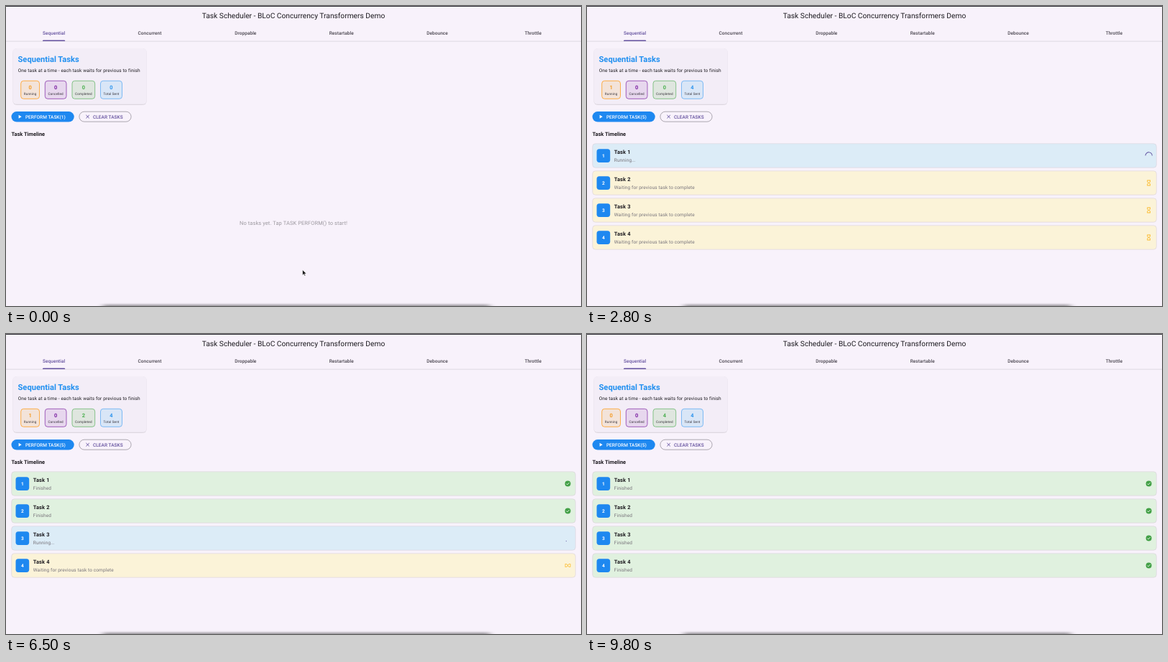
An HTML page for the animation above (9.9 s loop, 800 by 418 pixels).

```html
<!DOCTYPE html>
<html lang="en">
<head>
<meta charset="utf-8">
<title>Task Scheduler</title>
<style>
  html, body { margin: 0; width: 100%; height: 100%; overflow: hidden; background: #f8f2fb; }
  svg { display: block; width: 800px; height: 418px; }
  text { font-family: Roboto, sans-serif; font-size: 6.51px; letter-spacing: .116px; fill: #1d1b20; text-rendering: geometricPrecision; }
  .mid { text-anchor: middle; }
  .title { font-size: 10.23px; letter-spacing: 0; }
  .label { font-weight: 500; letter-spacing: .047px; }
  .heading { font-size: 11.16px; font-weight: 700; letter-spacing: 0; fill: #2190f0; }
  .count { font-size: 7.44px; font-weight: 700; }
  .tiny { font-size: 4.65px; fill: #37333b; }
  .section { font-size: 7.44px; font-weight: 700; letter-spacing: 0; }
  .task { font-size: 7.44px; font-weight: 700; letter-spacing: .15px; }
  .sub { fill: #77737a; }
  .empty { font-size: 7.44px; fill: #9c989f; }
  .badge { font-weight: 700; fill: #fff; }
  .hidden { display: none; }
</style>
</head>
<body>
<svg id="stage" viewBox="0 0 800 418">
  <defs>
    <filter id="soft" x="-10%" y="-20%" width="120%" height="150%">
      <feDropShadow dx="0" dy=".5" stdDeviation=".6" flood-color="#000" flood-opacity=".28"/>
    </filter>
    <filter id="lift" x="-10%" y="-40%" width="120%" height="200%">
      <feDropShadow dx="0" dy="1" stdDeviation="1" flood-color="#000" flood-opacity=".4"/>
    </filter>
    <filter id="blur" x="-5%" y="-200%" width="110%" height="500%"><feGaussianBlur stdDeviation="5 1.6"/></filter>
    <path id="hourglass" fill="#fbb826" d="M6 2v6l4 4-4 4v6h12v-6l-4-4 4-4V2zM16 16.5V20H8v-3.5l4-4zM12 11.500l-4-4V4h8v3.500z"/>
  </defs>
  <rect width="800" height="418" fill="#f8f2fb"/>
  <rect width="800" height="1" fill="#35323a"/>
  <rect x="135" y="416" width="538" height="6" fill="#000" opacity=".38" filter="url(#blur)"/>

  <text class="title mid" x="400" y="17.400">Task Scheduler - BLoC Concurrency Transformers Demo</text>
  <g id="tabs"></g>
  <rect y="48.800" width="800" height=".6" fill="#cbc5d0"/>
  <path d="M51 49v-.4a1.200 1.200 0 0 1 1.200-1.200h28.800a1.200 1.200 0 0 1 1.200 1.200v.4z" fill="#65529f"/>

  <rect x="9.300" y="59" width="186.500" height="77.800" rx="5.600" fill="#f3edf7" filter="url(#soft)"/>
  <text class="heading" x="16.500" y="77.900">Sequential Tasks</text>
  <text x="16.700" y="92.300">One task at a time - each task waits for previous to finish</text>
  <g id="stats"></g>

  <rect id="perform" x="7.500" y="147" width="87.200" height="14.600" rx="7.300"/>
  <path d="M17.600 151.700v5l4.100-2.500z" fill="#fff"/>
  <text id="performText" class="label" x="26.900" y="156.500" style="fill:#fff"></text>
  <rect x="101.900" y="147.200" width="72.200" height="14" rx="7" fill="none" stroke="#79747e" stroke-width=".6"/>
  <path d="M111.400 152l4.400 4.400m0-4.400l-4.400 4.400" stroke="#5c489b" stroke-width=".9"/>
  <text class="label" x="121" y="156.500" style="fill:#65529f">CLEAR TASKS</text>

  <text class="section" x="7.500" y="180.800">Task Timeline</text>
  <text id="empty" class="empty mid" x="400" y="305">No tasks yet. Tap TASK PERFORM() to start!</text>
  <g id="rows"></g>

  <path id="arrow" d="M0 0v7.200l1.700-1.500 1.200 2.600 1.200-.5-1.200-2.500h2.300z" fill="#111" stroke="#fff" stroke-width=".5"/>
  <path id="hand" transform="translate(33.600 150)" fill="#fff" stroke="#111" stroke-width=".7" stroke-linejoin="round"
    d="M-.8 .8a.7.7 0 0 1 1.400 0v2.300l.3-.3q.6-.3 1 .3 .7-.4 1.100.3 1-.2 1.100.7v1.600q0 1.300-.9 2.400h-3.400l-2.300-3q-.4-.8.400-1l1.300.8z"/>
</svg>
<script>
const LOOP = 9900, STEP = 100, TASK_MS = 2000, FIRST = 1200, TAP_GAP = 200, TASKS = 4;
const HOVER = [400, 2300];
const $ = id => document.getElementById(id);
const show = (el, on) => el.classList.toggle('hidden', !on);
const put = (el, text) => { if (el.textContent !== text) el.textContent = text; };

$('tabs').innerHTML = ['Sequential', 'Concurrent', 'Droppable', 'Restartable', 'Debounce', 'Throttle']
  .map((name, i) => `<text class="label mid" x="${(i + .5) * 800 / 6}" y="40.300"
    style="fill:${i ? '#49454f' : '#65529f'}">${name}</text>`).join('');

const stats = [
  ['Running', 20.7, 25.8, '#ff9d1f', '#f3e3d9', '#f59b23'],
  ['Cancelled', 54.3, 29.7, '#8b3bad', '#e7d7ee', '#7b1fa2'],
  ['Completed', 92, 31.7, '#6cb870', '#dfe6df', '#4caf50'],
  ['Total Sent', 131.5, 30, '#62aef3', '#d9e6f7', '#2b94ee']
];
$('stats').innerHTML = stats.map(([name, x, w, line, fill, ink]) => `
  <rect x="${x}" y="104.300" width="${w}" height="25" rx="3.700" fill="${fill}" stroke="${line}" stroke-width=".8"/>
  <text class="count mid" x="${x + w / 2}" y="116.200" style="fill:${ink}">0</text>
  <text class="tiny mid" x="${x + w / 2}" y="124.200">${name}</text>`).join('');
const counts = [...document.querySelectorAll('.count')];

$('rows').innerHTML = Array.from({ length: TASKS }, (_, i) => `
  <g class="row" transform="translate(0 ${191.5 + 38 * i})">
    <rect class="tile" x="7.700" y=".3" width="784.600" height="33.400" rx="4" stroke="#d8d0da" stroke-width=".6"/>
    <rect x="13.500" y="7.700" width="18.700" height="18.700" rx="3.700" fill="#1e88f0"/>
    <text class="badge mid" x="22.900" y="19.400">${i + 1}</text>
    <text class="task" x="37.800" y="14.300">Task ${i + 1}</text>
    <text class="sub" x="37.800" y="25.900"></text>
    <g transform="translate(781.600 17)">
      <g class="wait"><use href="#hourglass" transform="scale(.39) translate(-12 -12)"/></g>
      <circle class="spin" r="4.650" pathLength="360" fill="none" stroke="#5a4a9c" stroke-width=".95" stroke-linecap="square"/>
      <g class="done"><circle r="4" fill="#43a047"/><path d="M-2 .1l1.300 1.300 2.700-2.700" fill="none" stroke="#fff" stroke-width=".85"/></g>
    </g>
  </g>`).join('');
const rows = [...document.querySelectorAll('.row')].map(el => {
  const part = name => el.querySelector('.' + name);
  return { el, tile: part('tile'), sub: part('sub'), wait: part('wait'), spin: part('spin'), done: part('done') };
});

const looks = {
  wait: ['#fbf3d8', 'Waiting for previous task to complete'],
  spin: ['#dcecf7', 'Running...'],
  done: ['#e0f1df', 'Finished']
};

// cubic-bezier(.4, 0, .2, 1)
function ease(x) {
  if (x <= 0) return 0;
  if (x >= 1) return 1;
  let lo = 0, hi = 1;
  for (let i = 0; i < 20; i++) {
    const u = (lo + hi) / 2, v = 1 - u;
    if (1.2 * u * v * v + .6 * u * u * v + u * u * u < x) lo = u; else hi = u;
  }
  return lo * lo * (3 - 2 * lo);
}

// Material spinner: the arc grows, then its tail catches up, while it all turns
function spin(el, ms) {
  const p = ms / 1333 % 1, head = ease(p * 2), tail = ease(p * 2 - 1);
  const start = -90 + tail * 270 + ms / 2222 * 360 + p * 90;
  el.setAttribute('transform', `rotate(${start})`);
  el.setAttribute('stroke-dasharray', `${Math.max((head - tail) * 270, .1)} 360`);
}

function draw(t) {
  const sent = t < FIRST ? 0 : Math.min(TASKS, 1 + Math.floor((t - FIRST) / TAP_GAP));
  const done = t < FIRST ? 0 : Math.min(TASKS, Math.floor((t - FIRST) / TASK_MS));
  const tilt = 90 * ease((t - FIRST - TASK_MS) / 300);

  [done < sent ? 1 : 0, 0, done, sent].forEach((n, i) => put(counts[i], String(n)));
  put($('performText'), `PERFORM TASK(${sent + 1})`);
  show($('empty'), !sent);

  rows.forEach((row, i) => {
    show(row.el, i < sent);
    const state = i < done ? 'done' : i === done ? 'spin' : 'wait';
    const [fill, note] = looks[state];
    row.tile.setAttribute('fill', fill);
    put(row.sub, note);
    for (const key in looks) show(row[key], key === state);
    if (state === 'spin') spin(row.spin, Math.max(0, t - FIRST - TASK_MS * i));
    row.wait.setAttribute('transform', `rotate(${tilt})`);
  });

  const hover = t >= HOVER[0] && t < HOVER[1];
  $('perform').setAttribute('fill', hover ? '#3594f0' : '#1e88f0');
  $('perform').setAttribute('filter', hover ? 'url(#lift)' : 'none');
  const k = Math.min(1, t / 200);
  $('arrow').setAttribute('transform', `translate(${412.6 - 377.3 * k} ${367.7 - 213.4 * k})`);
  show($('arrow'), t < HOVER[0]);
  show($('hand'), hover);
}

const origin = performance.now();
function tick() {
  const t = (performance.now() - origin) % LOOP;
  draw(Math.floor(t / STEP) * STEP);
  requestAnimationFrame(tick);
}
tick();
</script>
</body>
</html>
```
